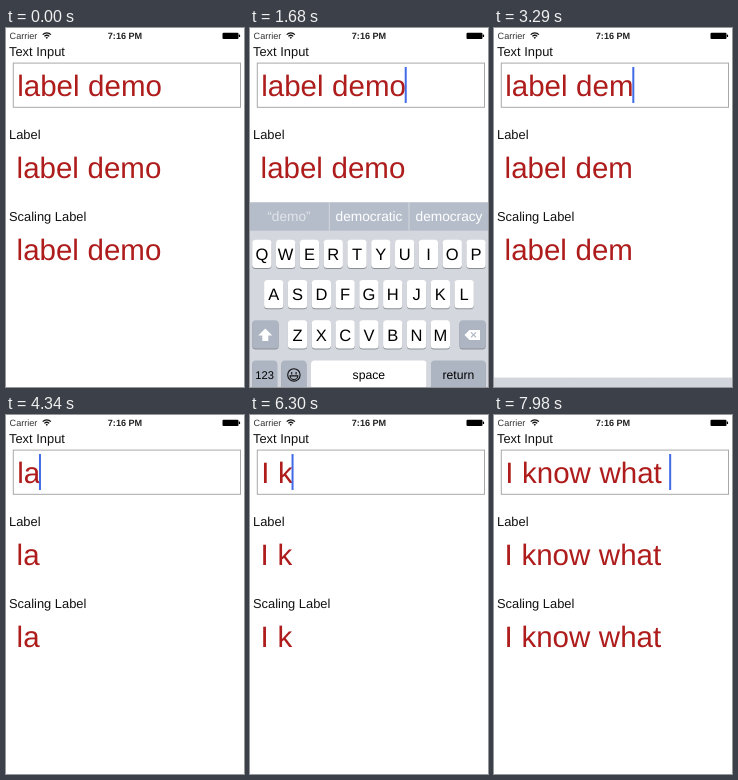
Recreate the animation shown at these times as an HTML page. Size 238 by 359 pixels, loop 8 s.

```html
<!DOCTYPE html>
<html lang="en">
<head>
<meta charset="utf-8">
<title>Label demo</title>
<style>
  html, body { margin: 0; width: 238px; height: 359px; overflow: hidden; background: #fff; }
  svg { display: block; }
  text { font-family: "Liberation Sans", Arial, sans-serif; white-space: pre; text-rendering: geometricPrecision; }
  .head { font-size: 12.9px; fill: #111; }
  .big { font-size: 29.5px; fill: #ae1c1c; font-kerning: none; word-spacing: .4px; }
  .status { font-size: 9.1px; }
  #keyboard text { text-anchor: middle; }
  #bar text { font-size: 13.7px; fill: #fff; }
</style>
</head>
<body>
<svg width="238" height="359" viewBox="0 0 238 359">
  <rect width="238" height="359" fill="#fff"/>
  <text class="status" x="3.6" y="11" fill="#333">Carrier</text>
  <g fill="none" stroke="#111" stroke-width="1.3">
    <path d="M36.7 6.6a5.8 5.8 0 0 1 8.2 0M38.4 8.4a3.4 3.4 0 0 1 4.8 0"/>
    <path d="M39.6 9.6a1.8 1.8 0 0 1 2.4 0L40.8 11z" fill="#111" stroke="none"/>
  </g>
  <text class="status" x="119" y="11" font-weight="bold" text-anchor="middle" fill="#222">7:16 PM</text>
  <rect x="216.500" y="4.700" width="16" height="6.300" rx="1"/>
  <rect x="232.800" y="6.500" width="1.300" height="2.500" rx=".6"/>

  <text class="head" x="3" y="27.500">Text Input</text>
  <rect x="7.300" y="35.100" width="227.200" height="44.200" fill="#fff" stroke="#a8a8a8"/>
  <text class="big" x="11.200" y="68"></text>
  <text class="head" x="3" y="110.500">Label</text>
  <text class="big" x="10.600" y="150"></text>
  <g id="scaling">
    <text class="head" x="3" y="192.500">Scaling Label</text>
    <text class="big" x="10.600" y="232"></text>
  </g>
  <rect id="caret" y="39" width="2" height="36" fill="#426be6"/>

  <g id="keyboard">
    <rect y="170" width="238" height="189" fill="#d4d8de"/>
    <g id="bar">
      <rect y="170" width="238" height="28.3" fill="#b5bdca"/>
      <path d="M79.3 170v28.3M159 170v28.3" stroke="#d4d8de"/>
      <text x="39" y="188.5" opacity=".6">“demo”</text>
      <text x="119" y="188.5">democratic</text>
      <text x="199" y="188.5">democracy</text>
    </g>
    <g id="keys"></g>
    <path d="M15.3 296l-7 7h4v5.5h6v-5.5h4z" fill="#fff"/>
    <path d="M214.5 302.5l5-5h10.5v10h-10.5z" fill="#fff"/>
    <path d="M221 300l5 5m0-5l-5 5" stroke="#adb5c2" stroke-width="1.2"/>
    <g fill="none" stroke="#111" stroke-width="1.1">
      <circle cx="43.9" cy="342.5" r="6.2"/>
      <path d="M41.7 339.5v2.5M46.1 339.5v2.5"/>
      <path d="M40 343.5h7.8a3.9 3.6 0 0 1-7.8 0z"/>
    </g>
  </g>
</svg>
<script>
const LOOP = 8000, STEP = 70;
const $ = id => document.getElementById(id);
const bigTexts = document.querySelectorAll('.big');

// Time at which each text appears
const edits = [
  [0, 'label demo'], [3220, 'label dem'], [3430, 'label de'], [3640, 'label d'],
  [3780, 'label '], [3920, 'label'], [4060, 'labe'], [4200, 'lab'], [4340, 'la'],
  [4830, 'l'], [5110, ''], [5460, 'I'], [6020, 'I '], [6300, 'I k'], [6440, 'I kn'],
  [6720, 'I kno'], [6860, 'I know'], [7210, 'I know '], [7350, 'I know w'],
  [7490, 'I know wh'], [7630, 'I know wha'], [7700, 'I know what'], [7980, 'I know what ']
];

function addKey(x, y, width, label, size, fill) {
  $('keys').insertAdjacentHTML('beforeend',
    `<rect x="${x}" y="${y + 1}" width="${width}" height="28.3" rx="3.5" fill="#8b9097"/>
     <rect x="${x}" y="${y}" width="${width}" height="28.3" rx="3.5" fill="${fill}"/>
     <text x="${x + width / 2}" y="${y + 14.3 + size * .36}" font-size="${size}">${label}</text>`);
}

[['QWERTYUIOP', 2.2], ['ASDFGHJKL', 14.1], ['ZXCVBNM', 37.9]].forEach(([letters, left], row) =>
  [...letters].forEach((c, i) => addKey(left + 23.8 * i, 207.3 + 40.3 * row, 19.3, c, 16.5, '#fff')));
const grey = '#adb5c2';
addKey(2.2, 287.9, 26.4, '', 12, grey);
addKey(209.4, 287.9, 26.4, '', 12, grey);
addKey(2.2, 328.2, 25, '123', 11.2, grey);
addKey(31.4, 328.2, 25, '', 12, grey);
addKey(61, 328.2, 115.6, 'space', 12.2, '#fff');
addKey(181, 328.2, 54.8, 'return', 12.2, grey);

// Critically damped spring from 1 to 0
function spring(ms) {
  const p = Math.max(0, ms) * .01826;
  return (1 + p) * Math.exp(-p);
}

const ramp = (t, from, to) => Math.min(1, Math.max(0, (t - from) / (to - from)));

function caretOpacity(t) {
  if (t < 1400) return 0;
  if (t >= 3220) return 1;
  return 1 - ramp(t, 1890, 2100) + ramp(t, 2380, 2590) - ramp(t, 2940, 3150);
}

function draw(now) {
  const t = Math.floor(now % LOOP / STEP) * STEP;
  const text = edits.findLast(e => e[0] <= t)[1];
  bigTexts.forEach(el => { el.textContent = text; });
  $('scaling').setAttribute('transform', `translate(0 ${text ? 0 : -35})`);

  const width = text ? bigTexts[0].getComputedTextLength() : 0;
  $('caret').setAttribute('x', 10 + width);
  $('caret').setAttribute('opacity', caretOpacity(t));

  const closing = t >= 3030;
  const hidden = closing ? 1 - spring(t - 3030) : spring(t - 1370);
  $('keyboard').setAttribute('transform', `translate(0 ${189 * hidden})`);
  $('bar').setAttribute('opacity', closing ? 1 - hidden : 1);
  requestAnimationFrame(draw);
}
requestAnimationFrame(draw);
</script>
</body>
</html>
```
